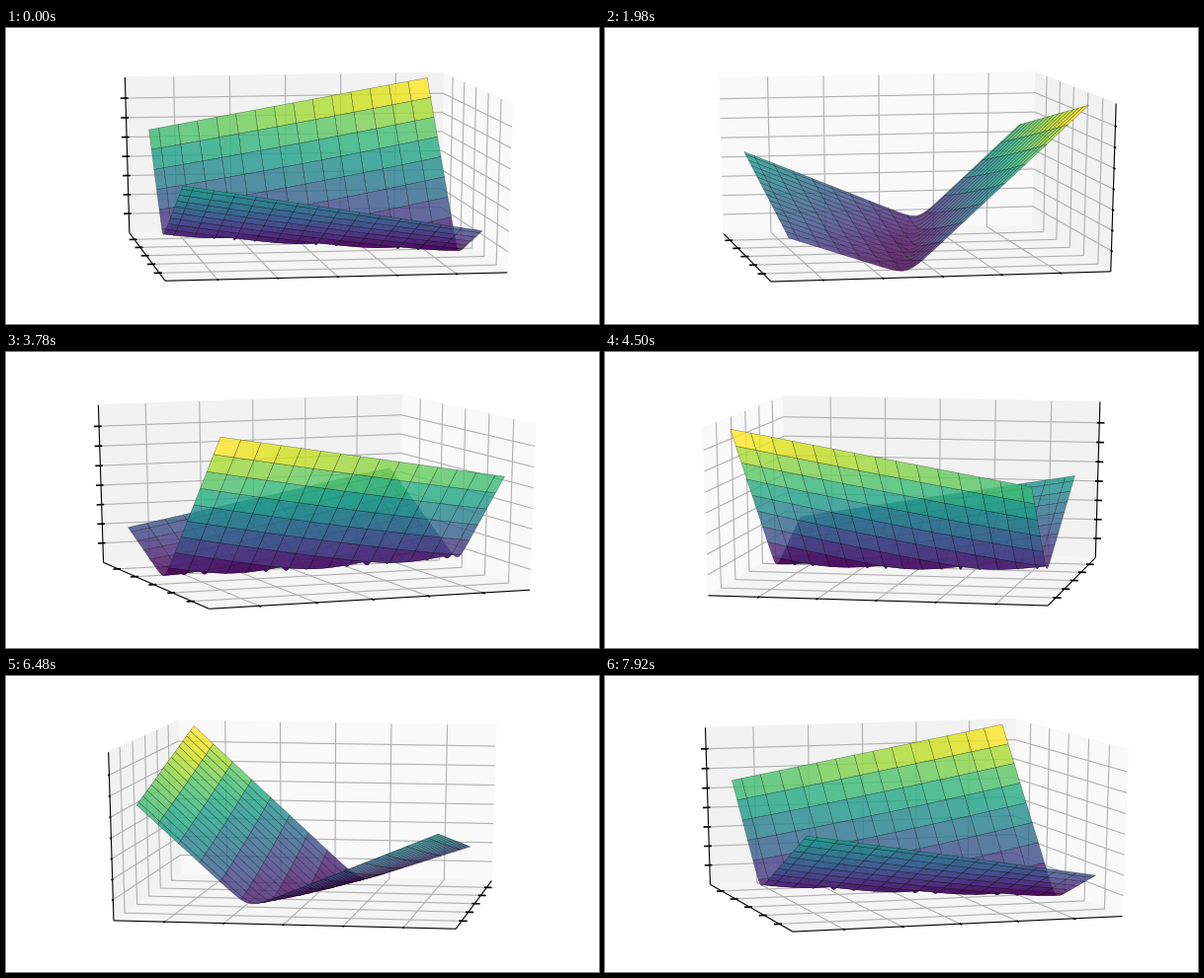
A matplotlib script for the animation above (8.1 s loop, 600 px wide and 300 px high).

```python
import numpy as np
import matplotlib.pyplot as plt
from matplotlib.animation import FuncAnimation
from matplotlib.collections import LineCollection, PolyCollection

FRAMES, INTERVAL = 45, 180
START_AZIM, ELEV = 81, np.radians(14)
DIST = 10
HALF = 0.5 + 1 / 48                      # half edge of the box, panes included
EDGE = 0.5 / 1.1                         # half extent of the surface in x and y
XY_TICKS = np.arange(-2, 3) / 5.5
TICKS = [XY_TICKS, XY_TICKS, np.arange(-3, 4) * 0.1288 - 0.003]
TICK_DIR = [1, 0, 0]                     # direction in which each axis' ticks point
PANE_COLORS = ["#f9f9f9", "#f2f2f2", "#f5f5f5"]


def project(points, azim):
    """Perspective view of points (..., 3): plane coordinates and depth."""
    x, y, z = np.moveaxis(np.asarray(points, float), -1, 0)
    right = -x * np.sin(azim) + y * np.cos(azim)
    toward = x * np.cos(azim) + y * np.sin(azim)
    depth = DIST - toward * np.cos(ELEV) - z * np.sin(ELEV)
    up = z * np.cos(ELEV) - toward * np.sin(ELEV)
    return np.stack([right / depth, up / depth], axis=-1), depth


def height(x, y):
    """Two planes meeting in a rounded, slightly sagging valley."""
    shallow = -0.1135 + 0.349 * x - (0.775 + 0.165 * x) * (EDGE - y)
    steep = 0.3435 - 0.344 * x - 1.86 * (y + EDGE)
    soft = 0.03 + 0.06 * x**2
    sag = 0.07 * (x**2 - EDGE**2) * (1 - (y / EDGE)**2)
    return shallow + soft * np.logaddexp(0, (steep - shallow) / soft) + sag


def surface_patches(n=59, stride=4):
    """Patches of stride x stride cells, outlined by all mesh points on their rim."""
    x, y = np.meshgrid(np.linspace(-EDGE, EDGE, n), np.linspace(-EDGE, EDGE, n))
    z = height(x, y)
    z = (z - z.min()) / np.ptp(z) - 0.5
    mesh = np.stack([x, y, z], axis=-1)
    patches = []
    for i in range(0, n - 1, stride):
        for j in range(0, n - 1, stride):
            p = mesh[i:i + stride + 1, j:j + stride + 1]
            patches.append(np.concatenate([p[0, :-1], p[:-1, -1],
                                           p[-1, :0:-1], p[:0:-1, 0]]))
    return patches


def with_coord(point, axis, value):
    point = point.copy()
    point[axis] = value
    return point


def pane(back, axis):
    j, k = (axis + 1) % 3, (axis + 2) % 3
    side = with_coord(back, j, -back[j])
    return [back, side, with_coord(side, k, -back[k]), with_coord(back, k, -back[k])]


def grid_lines(back):
    lines = []
    for axis, ticks in enumerate(TICKS):
        j, k = (axis + 1) % 3, (axis + 2) % 3
        for t in ticks:
            corner = with_coord(back, axis, t)
            lines.append([with_coord(corner, j, -back[j]), corner,
                          with_coord(corner, k, -back[k])])
    return lines


def axis_lines(back):
    """Black edges of the box and their tick marks."""
    edges, marks = [], []
    for axis, ticks in enumerate(TICKS):
        d = TICK_DIR[axis]
        start = with_coord(back, d, -back[d])
        edges.append([start, with_coord(start, axis, -back[axis])])
        sign = np.sign(start[d])
        for t in ticks:
            p = with_coord(start, axis, t)
            marks.append([with_coord(p, d, start[d] + sign / 60),
                          with_coord(p, d, start[d] - sign / 120)])
    return edges, marks


PATCHES = surface_patches()
mean_z = np.array([p[:, 2].mean() for p in PATCHES])
COLORS = plt.get_cmap("viridis")((mean_z - mean_z.min()) / np.ptp(mean_z))
COLORS[:, 3] = 0.8

fig = plt.figure(figsize=(6, 3), dpi=100, facecolor="white")
ax = fig.add_axes([0, 0, 1, 1])
ax.set(xlim=(-0.095, 0.09), ylim=(-0.095, 0.09))
ax.axis("off")

panes = PolyCollection([], facecolors=PANE_COLORS, edgecolors=PANE_COLORS,
                       linewidths=0.8, zorder=1)
grid = LineCollection([], colors="#b0b0b0", linewidths=0.8, zorder=2)
box = LineCollection([], colors="black", linewidths=0.8, zorder=3)
marks = LineCollection([], colors="black", linewidths=1.2, zorder=3)
surface = PolyCollection([], edgecolors=(0, 0, 0, 0.55), linewidths=0.3, zorder=4)
for artist in (panes, grid, box, marks, surface):
    ax.add_collection(artist, autolim=False)


def update(frame):
    azim = np.radians(START_AZIM + frame * 360 / FRAMES)
    back = HALF * np.array([-np.sign(np.cos(azim)), -np.sign(np.sin(azim)), -1])
    edges, ticks = axis_lines(back)
    panes.set_verts(project([pane(back, i) for i in range(3)], azim)[0])
    grid.set_segments(project(grid_lines(back), azim)[0])
    box.set_segments(project(edges, azim)[0])
    marks.set_segments(project(ticks, azim)[0])

    # far patches first
    views = [project(p, azim) for p in PATCHES]
    order = np.argsort([-depth.mean() for _, depth in views])
    surface.set_verts([views[i][0] for i in order])
    surface.set_facecolor(COLORS[order])
    return panes, grid, box, marks, surface


anim = FuncAnimation(fig, update, frames=FRAMES, interval=INTERVAL,
                     repeat=True, repeat_delay=0)
plt.show()
```
